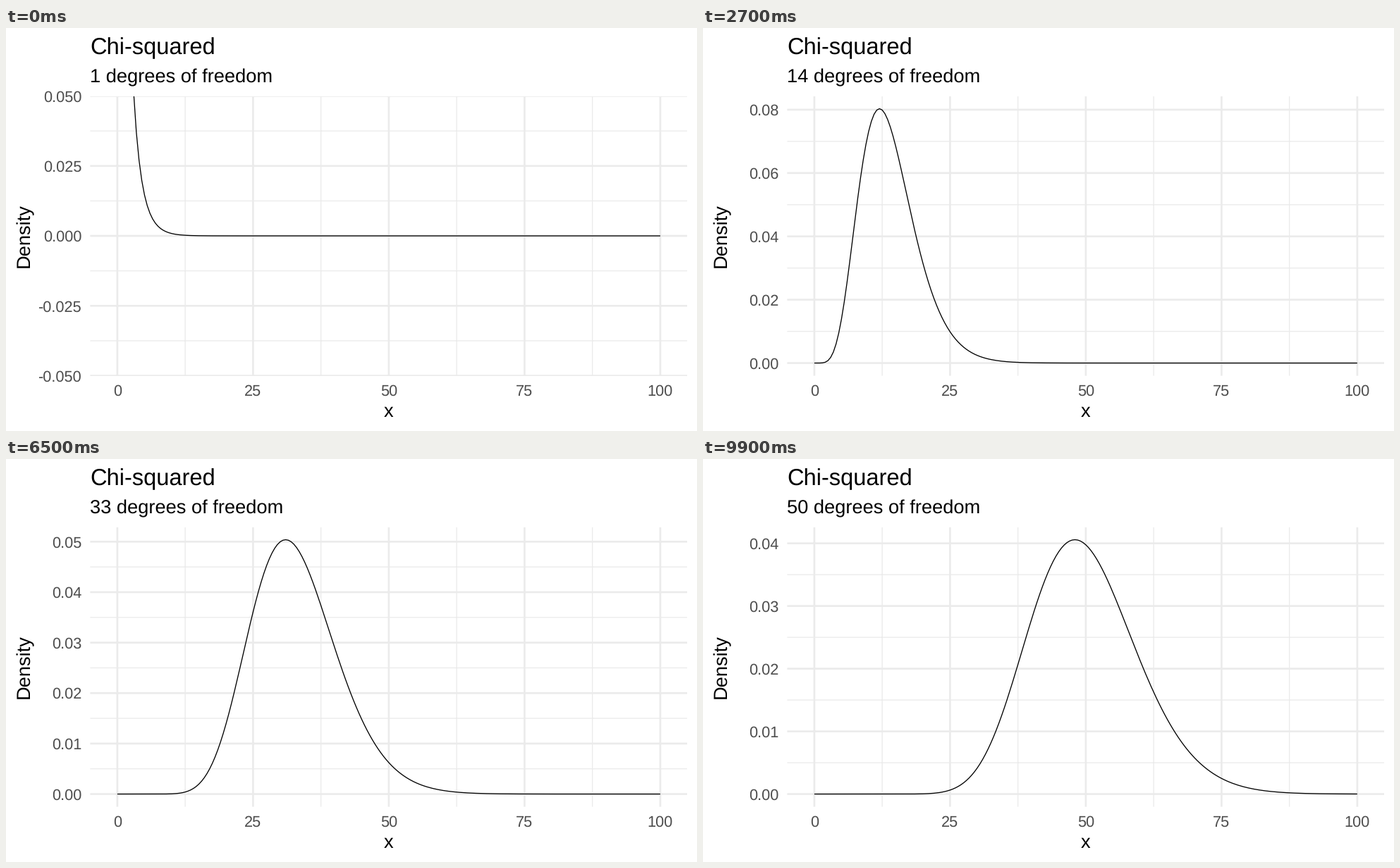
Write a matplotlib script that moves like this. It is 980 px wide and 572 px high and loops after 10 s.

```python
import math

import matplotlib.pyplot as plt
import numpy as np
from matplotlib.animation import FuncAnimation
from matplotlib.patches import Rectangle

W, H, DPI = 980, 572, 100
FRAMES, MAX_DF = 100, 50
PT = W / 396                       # pixels per layout point
LEFT, RIGHT, TOP, BOTTOM = 119.4, 966.4, 96.5, 493.6
GRID, TICK = "#EBEBEB", "#4D4D4D"
TITLE, BODY, SMALL = 13.2 * PT, 11 * PT, 8.8 * PT

plt.rcParams["font.family"] = "Liberation Sans"
plt.rcParams["text.hinting"] = "none"

fig = plt.figure(figsize=(W / DPI, H / DPI), dpi=DPI, facecolor="white")
ax = fig.add_axes([0, 0, 1, 1])
ax.set_xlim(0, W)
ax.set_ylim(H, 0)
ax.axis("off")
panel = Rectangle((LEFT, TOP), RIGHT - LEFT, BOTTOM - TOP, transform=ax.transData)


def px(x):
    return LEFT + (np.asarray(x) + 5) / 110 * (RIGHT - LEFT)


def label(x, y, text, size, color="black", **kw):
    return ax.text(x, y, text, fontsize=size * 72 / DPI, color=color,
                   ha="left", va="baseline", **kw)


def line(width, color):
    ln, = ax.plot([], [], color=color, lw=width * 72 / DPI, snap=False,
                  solid_capstyle="butt", solid_joinstyle="round")
    ln.set_clip_path(panel)
    return ln


def advance(text, size):
    """Advance width of a numeric label."""
    return size * sum({".": 0.278, "-": 0.333}.get(c, 0.556) for c in text)


def density(x, df):
    h = df / 2
    with np.errstate(divide="ignore"):
        y = x ** (h - 1) * np.exp(-x / 2) / (2 ** h * math.gamma(h))
    return np.where(np.isfinite(y), y, np.nan)


def nice_step(lo, hi, m=5):
    """Tick step by the extended Wilkinson score."""
    best, step = -9, None
    for i, q in enumerate((1, 5, 2, 2.5, 4, 3)):
        for z in range(-4, 1):
            d = q * 10.0 ** z
            for k in range(2, 13):
                for start in (-1, 0, 1):
                    a, b = start * d, (start + k - 1) * d
                    simple = 1 - i / 5 - (not a <= 0 <= b)
                    cover = 1 - 0.5 * ((hi - b) ** 2 + (lo - a) ** 2) / (0.1 * (hi - lo)) ** 2
                    r = (k - 1) / (b - a)
                    rt = (m - 1) / (max(b, hi) - min(a, lo))
                    dense = 2 - max(r / rt, rt / r)
                    score = 0.25 * simple + 0.2 * cover + 0.5 * dense + 0.05
                    if score > best + 1e-9:
                        best, step = score, d
    return step


def decimals(step):
    return next(d for d in range(6) if abs(step * 10 ** d - round(step * 10 ** d)) < 1e-6)


def multiples(step, lo, hi, shift=0.0):
    n = np.arange(-12, 13) + shift
    v = n * step
    return v[(v >= lo - 1e-9) & (v <= hi + 1e-9)]


def set_grid(ln, xs, ys):
    pts = [p for x in xs for p in ((x, TOP), (x, BOTTOM), (np.nan, np.nan))]
    pts += [p for y in ys for p in ((LEFT, y), (RIGHT, y), (np.nan, np.nan))]
    ln.set_data(*zip(*pts))


minor = line(1.32, GRID)
major = line(2.64, GRID)
curve = line(1.32, "black")
X = np.arange(0, 100.5, 0.5)

label(LEFT, 37.3, "Chi-squared", TITLE)
subtitle = label(LEFT, 77.2, "", BODY)
label((LEFT + RIGHT) / 2 - 0.25 * BODY, 552.3, "x", BODY)
label(33.2, (TOP + BOTTOM) / 2 + 1.667 * BODY, "Density", BODY,
      rotation=90, rotation_mode="anchor")
for v in range(0, 101, 25):
    label(px(v) - advance(str(v), SMALL) / 2, 521.8, str(v), SMALL, TICK)
ticks = [label(0, 0, "", SMALL, TICK) for _ in range(10)]


def update(k):
    t = 1 + (MAX_DF - 1) * k / (FRAMES - 1)
    df = round(t)
    y = density(X, df)
    if df == 1:
        lo, hi = -0.05, 0.05       # unbounded density: fixed view
    else:
        peak = np.nanmax(y)
        lo, hi = -0.05 * peak, 1.05 * peak

    def py(v):
        return BOTTOM - (v - lo) / (hi - lo) * (BOTTOM - TOP)

    step = nice_step(lo, hi) if df > 1 else 0.025
    breaks = multiples(step, lo, hi)
    set_grid(major, px(np.arange(0, 101, 25)), py(breaks))
    set_grid(minor, px(np.arange(12.5, 100, 25)), py(multiples(step, lo, hi, 0.5)))
    curve.set_data(px(X), py(y))

    places = decimals(step)
    for i, tick in enumerate(ticks):
        tick.set_visible(i < len(breaks))
        if i < len(breaks):
            text = f"{breaks[i]:.{places}f}"
            tick.set_text(text)
            tick.set_position((107.2 - advance(text, SMALL), py(breaks[i]) + 8))
    subtitle.set_text(f"{int(t + 1e-9)} degrees of freedom")
    return [minor, major, curve, subtitle, *ticks]


anim = FuncAnimation(fig, update, frames=FRAMES, interval=100, repeat=True)
plt.show()
```
